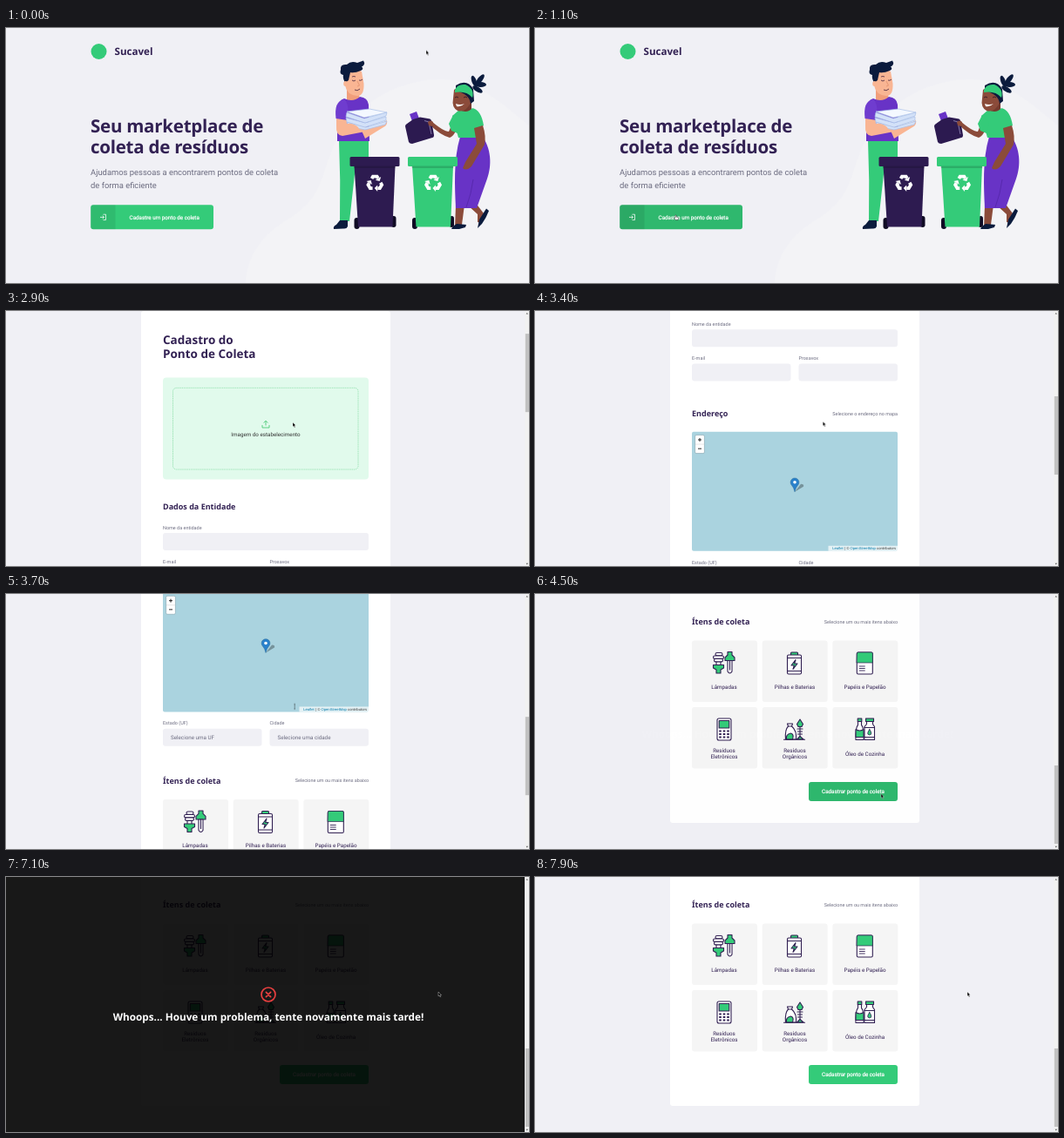
An HTML page that plays this animation: 600 by 293 pixels, repeating every 8 s.

```html
<!DOCTYPE html>
<html lang="pt">
<head>
<meta charset="utf-8">
<title>Ponto de coleta</title>
<style>
html, body { margin: 0; width: 100%; height: 100%; overflow: hidden; background: #f0f0f5; }
svg { display: block; width: 100vw; height: 100vh; }
text { font: 6.25px Roboto, sans-serif; fill: #322153; text-rendering: geometricPrecision; white-space: pre; }
.head { font-family: "Noto Sans", sans-serif; font-weight: 700; }
.h1 { font-size: 20.5px; letter-spacing: -.012em; }
.h2 { font-size: 13.5px; }
.h3 { font-size: 9px; }
.brand { font-size: 11.6px; }
.lead { font-size: 9.41px; fill: #6c6c80; }
.small { font-size: 5.47px; fill: #6c6c80; }
.hint { fill: #6c6c80; }
.mid { text-anchor: middle; }
.end { text-anchor: end; }
.cta { fill: #fff; stroke: #fff; stroke-width: .22; }
.field { fill: #f0f0f5; }
.icon { fill: #fff; stroke: #322153; stroke-width: 1.1; stroke-linejoin: round; stroke-linecap: round; }
.icon .g { fill: #34cb79; }
.icon .n { fill: none; }
.line { fill: none; stroke-width: .8; }
.navy { fill: #0b1b3d; }
.green { fill: #34cb79; }
.purple { fill: #6833c6; }
.skin { fill: #f9b593; }
.brown { fill: #8b4b3a; }

#home, #form, #page, #thumb, #modal, #pointer, #arrow, #hand, #beam, .btn {
  animation: 8s linear infinite;
}
#home { animation-name: home; }
#form { animation-name: form; }
#page { animation-name: scroll; }
#thumb { animation-name: thumb; }
#modal { animation-name: modal; }
#pointer { animation-name: move; }
#arrow { animation-name: arrow; }
#hand { animation-name: hand; }
#beam { animation-name: beam; }
#enter { animation-name: enter; }
#send { animation-name: send; }

@keyframes home { 0%, 16.24% { visibility: visible } 16.25%, 100% { visibility: hidden } }
@keyframes form { 0%, 16.24% { visibility: hidden } 16.25%, 100% { visibility: visible } }
@keyframes scroll {
  0%, 33.75% { transform: none }
  36.25% { transform: translateY(-68px) }
  46.25% { transform: translateY(-442px) }
  50.6%, 100% { transform: translateY(-625px) }
}
@keyframes thumb {
  0%, 33.75% { transform: none }
  36.25% { transform: translateY(21px) }
  46.25% { transform: translateY(136px) }
  50.6%, 100% { transform: translateY(192px) }
}
@keyframes modal {
  0%, 56.25% { opacity: 0 }
  58.5%, 93.75% { opacity: 1 }
  96%, 100% { opacity: 0 }
}
@keyframes move {
  0%, 1% { transform: translate(482px, 25.5px); animation-timing-function: ease-in-out }
  12%, 18.75% { transform: translate(161px, 215px); animation-timing-function: ease-in-out }
  30%, 36.25% { transform: translate(329px, 128px) }
  46.25%, 50.6% { transform: translate(331px, 126.5px); animation-timing-function: ease-in-out }
  55%, 68.75% { transform: translate(397px, 229.5px); animation-timing-function: ease-in-out }
  78.75%, 100% { transform: translate(496px, 132px) }
}
@keyframes arrow {
  0%, 10.9% { visibility: visible } 11%, 16.24% { visibility: hidden }
  16.25%, 43.6% { visibility: visible } 43.7%, 47.1% { visibility: hidden }
  47.2%, 53.9% { visibility: visible } 54%, 56.2% { visibility: hidden }
  56.25%, 100% { visibility: visible }
}
@keyframes hand {
  0%, 10.9% { visibility: hidden } 11%, 16.24% { visibility: visible }
  16.25%, 53.9% { visibility: hidden } 54%, 56.2% { visibility: visible }
  56.25%, 100% { visibility: hidden }
}
@keyframes beam {
  0%, 43.6% { visibility: hidden } 43.7%, 47.1% { visibility: visible }
  47.2%, 100% { visibility: hidden }
}
@keyframes enter { 0%, 10.5% { fill: #34cb79 } 13%, 100% { fill: #2fb86e } }
@keyframes send {
  0%, 53.5% { fill: #34cb79 } 56%, 69.5% { fill: #2fb86e } 72%, 100% { fill: #34cb79 }
}
</style>
</head>
<body>
<svg viewBox="0 0 600 293" preserveAspectRatio="none">
<defs>
  <g id="turn">
    <path d="M-3.2-4.6-2-6.7H2L3.1-4.8" fill="none" stroke="#fff" stroke-width="3.3"/>
    <path d="M6-6.4.4-3.1 4.6-2.1Z" fill="#fff"/>
  </g>
  <g id="recycle" transform="scale(1.15)">
    <use href="#turn"/>
    <use href="#turn" transform="rotate(120)"/>
    <use href="#turn" transform="rotate(240)"/>
  </g>
  <g id="bin">
    <path d="M5 10H52L49 80.5H9.5Z"/>
    <rect width="57" height="11" rx="1.5"/>
    <path d="M4.5 10.5H52.5V13H4.5Z" fill="#000" opacity=".15"/>
  </g>
  <g id="wheels" fill="#100b24">
    <rect x="5" y="70" width="6" height="13" rx="3"/>
    <rect x="47.5" y="68" width="5.5" height="13" rx="2.7"/>
  </g>
  <rect id="card" width="75" height="70.5" rx="3" fill="#f5f5f5"/>
  <rect id="half" class="field" width="113.5" height="20" rx="3"/>
</defs>

<rect width="600" height="293" fill="#f0f0f5"/>

<g id="home">
  <path d="M275 293C277 262 292 240 320 222C362 198 361 172 373 143C391 98 440 58 502 59C545 61 573 91 600 112V293Z" fill="#f3f3f6"/>
  <circle cx="106.5" cy="27" r="9" fill="#34cb79"/>
  <text class="head brand" x="124.5" y="31.3">Sucavel</text>
  <text class="head h1" x="97" y="120">Seu marketplace de</text>
  <text class="head h1" x="97" y="144">coleta de resíduos</text>
  <text class="lead" x="97" y="169">Ajudamos pessoas a encontrarem pontos de coleta</text>
  <text class="lead" x="97" y="183.6">de forma eficiente</text>
  <rect id="enter" class="btn" x="97.2" y="203.3" width="140.8" height="28" rx="3"/>
  <path d="M125.5 203.3V231.3H100.2Q97.2 231.3 97.2 228.3V206.3Q97.2 203.3 100.2 203.3Z" opacity=".08"/>
  <path d="M111.5 214.2H114.5V220.6H111.5M108 217.4H112.4M110.7 215.6 112.5 217.4 110.7 219.2" fill="none" stroke="#fff" stroke-width=".75"/>
  <text class="cta mid" x="181.7" y="219.6">Cadastre um ponto de coleta</text>

  <!-- man -->
  <path class="green" d="M382 129H416V150H402L394 222H383Q384 175 382 129Z"/>
  <path class="navy" d="M383 221H392V228Q391 231 387 230.5L376 231Q375 228 379 226Z"/>
  <path d="M391 70H404L406 83 391 84Z" fill="#f19e7b"/>
  <path class="skin" d="M388 51Q399 44 408 50L410.5 64Q411 78 403 78Q391 77 389 66Z"/>
  <path class="navy" d="M384 48Q383 41 391 42Q396 37 403 40L410 37.5Q413 42 408 44.5Q411 47 407 49Q400 52 395 51L393 60 389 63Q386 57 387 54Q382 53 384 48Z"/>
  <ellipse class="skin" cx="389.5" cy="64" rx="2.3" ry="3"/>
  <path class="line" d="M397 60Q399 62 401 60M405 60Q407 61 409 59M397 56Q399 55 401 56M400 71Q403 73 406 70" stroke="#43233b"/>
  <path class="line" d="M403 61 405.5 66 403 67" stroke="#e08e6c"/>
  <path class="purple" d="M388 81Q398 86 406 79Q415 80 416 88L417 130H380V92Q381 83 388 81Z"/>
  <path class="skin" d="M379 101 391 105 391 113 411 110 412 119 386 124Q378 123 379 112Z"/>
  <path d="M378.5 104Q376 84 388 82Q394 86 392 106Z" fill="#6f3ccf"/>
  <path class="skin" d="M408 118 430 110 437 106Q438 112 433 114L412 127Z"/>
  <g fill="#d3e1f8" stroke="#a9c0e9" stroke-width=".7">
    <path d="M391 108 413 114 437 107 435 111 412 117 392 113Z"/>
    <path d="M390 103 412 109 436 102 436 106 412 114 391 108Z"/>
    <path d="M391 97 411 104 437 97 436 101 412 109 390 102Z"/>
    <path d="M391 96 417 93 437 97 411 103Z" fill="#f4f8ff"/>
  </g>
  <path class="skin" d="M391 110Q398 109 404 114Q407 118 400 119L391 118Z"/>

  <!-- woman -->
  <path class="brown" d="M538 200 548 213 545 224 541 223 541 214 530 204Z"/>
  <path class="navy" d="M551 207.5 554 210Q551 218 546 225L541 230 543 220Z"/>
  <path class="brown" d="M516 203H526L523 226 515 230Z"/>
  <path class="navy" d="M517 225 528 226 527 229 520 231H511Q512 228 517 225Z"/>
  <path class="purple" d="M521 125H547C558 142 557 161 551 176L540 207H516C515 183 513 152 521 125Z"/>
  <path class="line" d="M536 174Q534 190 528 206" stroke="#5426a8"/>
  <path d="M521 87 534 85 534 99 522 98Z" fill="#743a2e"/>
  <path class="green" d="M512 101 520 94Q529 99 535 92Q545 94 548 112L539 118 545 126H519Z"/>
  <path class="brown" d="M513 107 508 119Q502 119 488 107L485 110Q498 123 509 126Q514 124 517 116Z"/>
  <path class="green" d="M511 118 508 110 513 100 521 108 518 121Z"/>
  <path class="brown" d="M537 115 547 112Q551 124 549 134L534 159Q528 165 524 161L527 154 540 133Z"/>
  <path class="brown" d="M514 71Q525 62 535 73L533 86Q527 98 518 95Q511 91 513 81Z"/>
  <path class="navy" d="M516 66Q529 58 536 70L537 84 533 87Q532 76 516 72Z"/>
  <path class="green" d="M515 71Q518 64 527 65Q538 70 535 80Q528 72 515 74Z"/>
  <g class="navy">
    <ellipse cx="537" cy="61" rx="2.7" ry="6.5" transform="rotate(-20 537 61)"/>
    <ellipse cx="544" cy="59" rx="2.8" ry="7" transform="rotate(38 544 59)"/>
    <ellipse cx="544.5" cy="65" rx="6.5" ry="3"/>
    <ellipse cx="541" cy="70.5" rx="6.5" ry="2.8" transform="rotate(32 541 70.5)"/>
  </g>
  <path class="line" d="M515 80Q517 78 519 80M525 80Q527 78 529 80" stroke="#2b1423"/>
  <path d="M516 87Q521 89 526 87Q522 91 517 90Z" fill="#fff"/>

  <!-- jug -->
  <path class="purple" d="M463 99 471 96 474 104 466 107Z"/>
  <path d="M458 113Q458 111 460 110L467 105 475 102.5 484 104Q487 104 488 106L491 123Q491 126 489 126L466 133Q463 133 462 131Z" fill="#2c1a50"/>
  <path d="M480 106.5 485 108 488 122" fill="none" stroke="#8d82b0" stroke-width=".9"/>
  <path class="brown" d="M484 108Q487 105 490 108L489 113 485 112Z"/>

  <!-- bins -->
  <use href="#wheels" x="394.5" y="148"/>
  <use href="#bin" x="394.5" y="148" fill="#2d1b50"/>
  <use href="#wheels" x="461" y="148"/>
  <use href="#bin" x="461" y="148" fill="#34cb79"/>
  <use href="#recycle" x="423.3" y="178.3" transform="translate(0 0)" style="display:none"/>
  <g transform="translate(423.3 178.3)"><use href="#recycle"/></g>
  <g transform="translate(490 178.3)"><use href="#recycle"/></g>
</g>

<g id="form">
  <g id="page">
    <circle cx="91" cy="28" r="9" fill="#34cb79"/>
    <text class="head brand" x="109" y="32.3">Sucavel</text>
    <path d="M456 28H450.5M453 25.5 450.5 28 453 30.5" fill="none" stroke="#34cb79" stroke-width=".8"/>
    <text class="end" x="512" y="30.2" stroke="#322153" stroke-width=".2">Voltar para home</text>

    <g transform="translate(0 68)">
      <rect x="155" y=".5" width="286" height="819.5" rx="3" fill="#fff"/>
      <text class="head h2" x="180" y="38.6">Cadastro do</text>
      <text class="head h2" x="180" y="54.8">Ponto de Coleta</text>
      <rect x="180" y="77" width="236" height="117" rx="4" fill="#e1faec"/>
      <rect x="191.5" y="88.8" width="212.5" height="93.7" rx="4" fill="none" stroke="#4ecb79" stroke-width=".5" stroke-dasharray="1.2 .9"/>
      <path d="M294 131.5V134.5H302V131.5M298 132V126.8M295.6 129 298 126.6 300.4 129" fill="none" stroke="#4ecb79" stroke-width=".9"/>
      <text class="mid" x="298" y="144.2" style="fill:#333">Imagem do estabelecimento</text>

      <text class="head h3" x="180" y="228">Dados da Entidade</text>
      <text class="small" x="180" y="251">Nome da entidade</text>
      <rect class="field" x="180" y="255.5" width="236" height="20" rx="3"/>
      <text class="small" x="180" y="290">E-mail</text>
      <text class="small" x="302.5" y="290">Prosavox</text>
      <use href="#half" x="180" y="294.7"/>
      <use href="#half" x="302.5" y="294.7"/>

      <text class="head h3" x="180" y="355">Endereço</text>
      <text class="small end" x="416" y="354">Selecione o endereço no mapa</text>
      <rect x="180" y="373" width="236" height="137" rx="2" fill="#aad3df"/>
      <rect x="183.6" y="376.8" width="10.8" height="21" rx="1.5" fill="#fff" stroke="#8dabb5" stroke-width=".7"/>
      <path d="M184 387.3H194" stroke="#ccc" stroke-width=".5"/>
      <path d="M187 382.2H191M189 380.2V384.2M187 392.4H191" stroke="#111" stroke-width=".9"/>
      <path d="M298 442 305 433Q309 433 308 436Z" opacity=".3"/>
      <path d="M298 442Q297 437 294.5 434.5A4.9 4.9 0 1 1 301.5 434.5Q299 437 298 442Z" fill="#2a81cb" stroke="#2e6c97" stroke-width=".5"/>
      <circle cx="298" cy="431" r="1.8" fill="#fff"/>
      <rect x="336.5" y="504" width="79.5" height="6" fill="#fff" opacity=".7"/>
      <text class="end" x="414" y="508.5" style="font:4.2px 'Liberation Sans',sans-serif;fill:#333"><tspan fill="#0078a8">Leaflet</tspan> | © <tspan fill="#0078a8">OpenStreetMap</tspan> contributors</text>
      <text class="small" x="180" y="525">Estado (UF)</text>
      <text class="small" x="302.5" y="525">Cidade</text>
      <use href="#half" x="180" y="529.3"/>
      <use href="#half" x="302.5" y="529.3"/>
      <text class="hint" x="189" y="541.6">Selecione uma UF</text>
      <text class="hint" x="311.5" y="541.6">Selecione uma cidade</text>

      <text class="head h3" x="180" y="592.2">Ítens de coleta</text>
      <text class="small end" x="416" y="591">Selecione um ou mais itens abaixo</text>
      <use href="#card" x="180" y="610.5"/>
      <use href="#card" x="260.7" y="610.5"/>
      <use href="#card" x="341.3" y="610.5"/>
      <use href="#card" x="180" y="687"/>
      <use href="#card" x="260.7" y="687"/>
      <use href="#card" x="341.3" y="687"/>
      <text class="mid" x="217" y="665.8">Lâmpadas</text>
      <text class="mid" x="298" y="665.8">Pilhas e Baterias</text>
      <text class="mid" x="378.5" y="665.8">Papéis e Papelão</text>
      <text class="mid" x="217" y="739">Resíduos</text>
      <text class="mid" x="217" y="746.3">Eletrônicos</text>
      <text class="mid" x="298" y="739">Resíduos</text>
      <text class="mid" x="298" y="746.3">Orgânicos</text>
      <text class="mid" x="378.5" y="742.6">Óleo de Cozinha</text>

      <!-- icons, each centred on its origin -->
      <g class="icon" transform="translate(217 636)">
        <rect x="-10" y="-11.5" width="8" height="3.4" rx="1.7"/>
        <rect x="-12.5" y="-8" width="12" height="3.4" rx="1.7"/>
        <rect x="-11.5" y="-4.5" width="10" height="3.4" rx="1.7"/>
        <path d="M-9-1V3M-4-1V3"/>
        <path class="g" d="M-12.5 2.5H-.5V6L-4 8V12H-9V8L-12.5 6Z"/>
        <path class="g" d="M4-12.5H9V-9L12-6V-2.5H1V-6L4-9Z"/>
        <path d="M4-2.5H9V10Q6.5 14 4 10ZM6.5-2V8"/>
      </g>
      <g class="icon" transform="translate(297.5 636)">
        <rect class="g" x="-4" y="-12" width="8" height="4" rx="1"/>
        <rect x="-8" y="-9" width="16" height="22" rx="1.5"/>
        <path class="n" d="M-8-5.5H8M-8 9.5H8"/>
        <path class="g" d="M1.5-3.5-3.5 3H-.2L-1.5 7.5 3.5 1H.2Z"/>
      </g>
      <g class="icon" transform="translate(378.3 636.5)">
        <rect x="-9" y="-12.5" width="18" height="25" rx="1.5"/>
        <path class="g" d="M-9-11Q-9-12.5-7.5-12.5H7.5Q9-12.5 9-11V-.5H-9Z" stroke-width=".7"/>
        <path class="n" d="M-6 3.5H0M-6 6H0M-6 8.5H0" stroke-width=".9"/>
      </g>
      <g class="icon" transform="translate(217 712.5)">
        <rect x="-8" y="-12.5" width="16" height="25" rx="2"/>
        <rect class="g" x="-5.8" y="-10" width="11.6" height="8.5"/>
        <path class="n" d="M-5.8 2H5.8M-5.8 5.5H5.8M-5.8 9H5.8" stroke-width="2.2" stroke-dasharray="2.6 1.9" stroke-linecap="butt"/>
      </g>
      <g class="icon" transform="translate(297.5 713)">
        <path d="M-8-7H-2L-3-4Q3 1 2 11H-10Q-11 0-7-4Z"/>
        <path class="n" d="M-7-4H-3M6.5-4V9M3.5-1H9.5M4 2H9M4 5H9"/>
        <path class="g" d="M6.5-12 10-6.5 8.5-3.5H4.5L3-6.5Z"/>
        <path class="g" d="M3 11 6.5 7.5 10.5 11Z"/>
        <path class="g" d="M-9 11Q-10 5-4 4Q0 5-2 11Z"/>
        <path d="M-12 11.3H12"/>
      </g>
      <g class="icon" transform="translate(378.5 712.5)">
        <path d="M-8-9H-4V-5Q-1-2-1.5 12H-10.5Q-11-2-8-5Z"/>
        <path class="g" d="M-8.3-12.5H-3.7V-9H-8.3ZM-10.5 0Q-6 3-1.5 0V9H-10.5Z"/>
        <path d="M2-9H9V-6L11-3V12H-.5V-3L2-6Z"/>
        <path class="g" d="M1-12.5H10V-9H1Z"/>
        <path class="n" d="M-.5-2H11M-.5 9H11"/>
        <path class="g" d="M5.3 0Q9.5 6 5.3 6.5Q1 6 5.3 0Z" stroke-width=".8"/>
      </g>

      <rect id="send" class="btn" x="314" y="773" width="102" height="22" rx="3"/>
      <text class="cta mid" x="365" y="786.3">Cadastrar ponto de coleta</text>
    </g>
  </g>

  <g id="modal">
    <rect width="595" height="293" opacity=".9"/>
    <circle cx="301" cy="135" r="8" fill="none" stroke="#e83f3f" stroke-width="1.7"/>
    <path d="M298.4 132.4 303.6 137.6M303.6 132.4 298.4 137.6" stroke="#e83f3f" stroke-width="1.7" stroke-linecap="round"/>
    <text class="head mid" x="301" y="165" style="font-size:11.75px;fill:#fff">Whoops... Houve um problema, tente novamente mais tarde!</text>
  </g>

  <rect x="595.3" width="4.7" height="293" fill="#f1f1f1"/>
  <path d="M596.6 3.6H599L597.8 2ZM596.6 289.8H599L597.8 291.4Z" fill="#505050"/>
  <rect id="thumb" x="595.8" y="5" width="4.2" height="90" fill="#c1c1c1"/>
</g>

<g id="pointer">
  <path id="arrow" d="M0 0V4.9L1.1 3.9 2 5.9 2.8 5.5 2 3.6H3.5Z" stroke="#fff" stroke-width=".35"/>
  <path id="hand" d="M0 0Q.9-.5 1 .4V2L3 2.5Q3.7 2.7 3.5 3.6L3 5.6H.4L-1.4 3.2Q-1.2 2.4 0 3.2Z" fill="#fff" stroke="#111" stroke-width=".45"/>
  <path id="beam" d="M-.6 0H1M.2 0V5.6M-.6 5.6H1" fill="none" stroke="#222" stroke-width=".45"/>
</g>
</svg>
</body>
</html>
```
